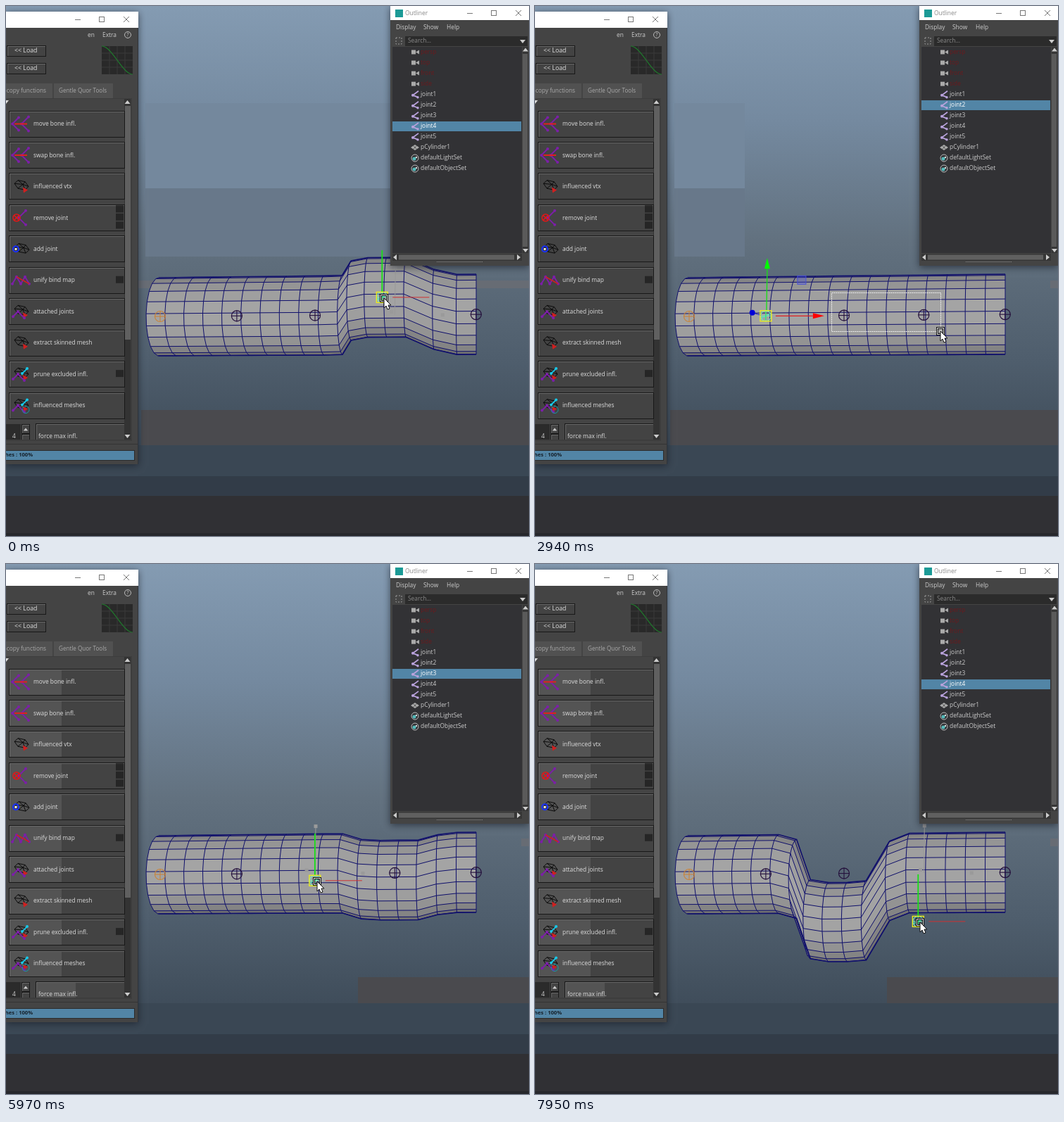
These frames come from a looping animation (743x753 px, 8 s). An HTML page with a canvas:

```html
<!DOCTYPE html>
<html lang="en">
<head>
<meta charset="utf-8">
<title>Skinning demo</title>
<style>
  html, body { margin: 0; width: 100%; height: 100%; overflow: hidden; background: #303034; }
  canvas { display: block; }
</style>
</head>
<body>
<canvas id="stage" width="743" height="753"></canvas>
<script>
const g = document.getElementById('stage').getContext('2d');
const LOOP = 8000, STEP = 135, SWAP = 4200, RINGS = 17, SIDES = 10, MESH = 5;
const NAVY = '#10106c', GREEN = '#3dffa0', BLUE = '#5285a6';

const joints = Array.from({ length: 5 }, (_, n) => [219 + 107.8 * n + 1.1 * n * n, 441 - .7 * n]);

// Mouse actions: the pointer goes from one point to another between start and
// reach, then rests until end. A pick becomes the selection at the end.
const drag = (start, reach, end, joint, to, from = [0, 0]) => ({ start, reach, end, joint, from, to });
const box = (start, reach, end, from, to, pick) => ({ start, reach, end, from, to, pick, box: true });
const stay = (start, end, to, pick) => ({ start, reach: end, end, from: to, to, pick });

const actions = [
  drag(0, 400, 690, 3, [0, 38], [-18, -25]),
  box(960, 1190, 1230, [306, 424], [346, 458], [1]),
  drag(1350, 1600, 2150, 1, [-4, 37]),
  box(2430, 2940, 3100, [421, 407], [576, 462], [2, 3]),
  stay(3645, 3700, [600, 400], [2, 3, MESH]),
  stay(SWAP, 4720, [106, 213]),
  stay(4960, 5060, [490, 572]),
  box(5330, 5540, 5540, [420, 416], [456, 462], [2]),
  drag(5850, 6440, 6880, 2, [-1, 67]),
  box(7180, 7400, 7530, [510, 422], [551, 471], [3]),
  drag(7650, 7940, LOOP, 3, [-8, 69])
];

const clamp = v => Math.max(0, Math.min(1, v));
const smooth = v => v * v * (3 - 2 * v);
const mix = (a, b, u) => a.map((v, i) => v + (b[i] - v) * u);

const offset = (act, t) => mix(act.from, act.to, clamp((t - act.start) / (act.reach - act.start)));

function pointerOn(act, t) {
  const p = offset(act, t);
  if (act.joint === undefined) return p;
  const [x, y] = joints[act.joint];
  return [x + p[0] + 3, y + p[1] + 1];
}

function pointerAt(t) {
  const past = actions.filter(a => a.start <= t).pop();
  const next = actions.find(a => a.start > t);
  if (t < past.end || !next) return pointerOn(past, t);
  const u = (t - past.end) / (next.start - past.end);
  return mix(pointerOn(past, past.end), pointerOn(next, next.start), u);
}

// Joints 2 and 3 trade the parts of the mesh they move
function weight(ring, joint, t) {
  const part = t > SWAP && joint > 1 ? 5 - joint : joint;
  return smooth(clamp((2.85 - Math.abs(ring - .2 - 4.17 * part)) / 1.55));
}

function rect(x, y, w, h, color) {
  g.fillStyle = color;
  g.fillRect(x, y, w, h);
}
function frame(x, y, w, h, color, width = 1) {
  g.strokeStyle = color;
  g.lineWidth = width;
  g.strokeRect(x, y, w, h);
}
function trace(points, close) {
  g.beginPath();
  points.forEach(p => g.lineTo(p[0], p[1]));
  if (close) g.closePath();
}
function line(color, width, ...points) {
  trace(points);
  g.strokeStyle = color;
  g.lineWidth = width;
  g.stroke();
}
function poly(color, ...points) {
  trace(points, true);
  g.fillStyle = color;
  g.fill();
}
function dot(x, y, r, color) {
  g.beginPath();
  g.arc(x, y, r, 0, 7);
  g.fillStyle = color;
  g.fill();
}
function ring(x, y, r, color, width = 1) {
  g.beginPath();
  g.arc(x, y, r, 0, 7);
  g.strokeStyle = color;
  g.lineWidth = width;
  g.stroke();
}
function cross(x, y, r, color, width = 1) {
  line(color, width, [x - r, y - r], [x + r, y + r]);
  line(color, width, [x - r, y + r], [x + r, y - r]);
}
function text(s, x, y, color = '#ccc', size = 8.4, align = 'left', bold = '') {
  g.font = `${bold} ${size}px "Open Sans", "Noto Sans", sans-serif`;
  g.textAlign = align;
  g.textBaseline = 'middle';
  g.fillStyle = color;
  g.fillText(s, x, y);
}
function arrow(x, y, dx, dy) {
  poly('#ccc', [x + dx * 3, y + dy * 3], [x - dx * 2 + dy * 4, y - dy * 2 + dx * 4], [x - dx * 2 - dy * 4, y - dy * 2 - dx * 4]);
}
function dashed(pattern, paint) {
  g.setLineDash(pattern);
  paint();
  g.setLineDash([]);
}
function windowBox(x, y, w, h, bar, buttonsX) {
  g.save();
  g.shadowColor = 'rgba(20,25,35,.65)';
  g.shadowBlur = 10;
  g.shadowOffsetY = 2;
  rect(x, y, w, h, '#444');
  g.restore();
  rect(x, y, w, bar, '#fff');
  const by = Math.floor(y + bar / 2);
  line('#777', 1, [buttonsX - 4, by + .5], [buttonsX + 4, by + .5]);
  frame(buttonsX + 30.5, by - 3.5, 7, 7, '#777');
  cross(buttonsX + 69, by, 4, '#777');
}

function background(t) {
  const sky = g.createLinearGradient(0, 0, 0, 668);
  ['#849bb2', '#74899f', '#62717f', '#4f5e6d', '#3a4754'].forEach((c, i) => sky.addColorStop(i / 4, c));
  rect(0, 0, 743, 668, sky);
  if (t < 3480) {
    const w = t < 1230 ? 545 : 100;
    rect(198, 138, w, 121, '#74889d');
    rect(198, 259, w, 97, '#68788a');
  }
  rect(t < 1230 ? 188 : 732, 390, 555, 11, '#676c74');
  const left = t < SWAP ? 192 : 500, top = t < 5850 ? 574 : 587;
  rect(left, top, 743 - left, 624 - top, '#4a4a4e');
  rect(0, 624, 743, 44, '#3a4754');
  rect(0, 668, 743, 28, '#323c48');
  rect(0, 696, 743, 53, '#303034');
  rect(0, 749, 743, 4, '#26272c');
}

function mesh(t, act, dx, dy, color) {
  // Edges along the tube are turned a little; the first and last are its outline
  const angles = Array.from({ length: SIDES + 2 }, (_, k) =>
    Math.max(0, Math.min(Math.PI, (k - .25) * Math.PI / SIDES)));
  const rows = Array.from({ length: RINGS + 1 }, (_, i) => {
    const u = i / RINGS, w = act ? weight(i, act.joint, t) : 0;
    return angles.map(a => [
      217 + 451 * u - 16 * u * (1 - u) - 18 * (1 - u) * Math.sin(a) + dx * w,
      441.5 - 3.5 * u - (55.5 + 1.5 * u) * Math.cos(a) + dy * w
    ]);
  });
  for (let i = 0; i < RINGS; i++) {
    for (let k = 0; k <= SIDES; k++) {
      const a = (angles[k] + angles[k + 1]) / 2;
      const v = Math.round(98 + 66 * Math.sin(a) ** .8 + 6 * Math.cos(a));
      poly(`rgb(${v},${v},${v})`, rows[i][k], rows[i + 1][k], rows[i + 1][k + 1], rows[i][k + 1]);
    }
  }
  rows.forEach(r => line(color, 1, ...r));
  angles.forEach((a, k) => line(color, a % Math.PI ? 1 : 1.6, ...rows.map(r => r[k])));
}

function jointMark(x, y, color) {
  ring(x, y, 7.5, color, 1.2);
  line(color, 1.1, [x - 8, y], [x + 8, y]);
  line(color, 1.1, [x, y - 8], [x, y + 8]);
}

function manipulator(n, dx, dy, dragging) {
  const [hx, hy] = joints[n], x = hx + dx, y = hy + dy;
  const bx = hx - 26.5 + 7.3 * n, by = hy - 4.5;
  if (dragging) {
    line('#999', 1, [hx, hy], [hx + 1, hy - 67]);
    [[hx + 1, hy - 67], [hx + 68, hy], [bx, by]].forEach(p => rect(p[0] - 2.5, p[1] - 2.5, 5, 5, '#9a9a9a'));
    line('#16e016', 1.8, [x, y - 8], [x, y - 67]);
    line('#d03030', 1, [x + 15, y], [x + 67, y]);
  } else {
    line('#16e016', 1.3, [x + 1, y - 8], [x + 2, y - 67]);
    poly('#00ff00', [x + 2, y - 82], [x + 6, y - 67], [x - 2, y - 67]);
    line('#e02020', 1.2, [x + 14, y], [x + 67, y]);
    poly('#ff0000', [x + 83, y], [x + 67, y - 4], [x + 67, y + 4]);
    line('#2020d0', 1, [bx, by], [x - 7, y - 1]);
    dot(bx, by, 4, '#0000d8');
    rect(x + 45, y - 57, 12, 12, 'rgba(70,80,230,.3)');
    frame(x + 45, y - 57, 12, 12, '#4a50d8');
  }
  line('#44f0c0', 1.2, [x - 6, y + 3], [x + 6, y - 3]);
  line('#30e060', 1.2, [x, y - 6], [x, y + 6]);
  frame(x - 8, y - 7.5, 16, 15, '#f0f018', 1.3);
}

function bone(color, ...points) {
  line(color, 2, ...points);
  points.forEach(p => dot(p[0], p[1], 2, color));
}
function chevron(x, y, r) {
  bone('#7c1fa8', [x + r, y - r], [x, y], [x + r, y + r]);
}
function cage(x, y) {
  const corners = Array.from({ length: 6 }, (_, i) => [x + 10 * Math.cos(i * 1.05), y + 7 * Math.sin(i * 1.05 + .3)]);
  corners.forEach((c, i) => line('#0a0a0a', 1, [x + 2, y - 1], c, corners[(i + 1) % 6]));
}

const icons = {
  bones(y) {
    chevron(9, y, 9);
    chevron(22, y, 10);
    line('#e02020', 2, [12, y], [30, y]);
  },
  cut(y) {
    chevron(18, y, 10);
    ring(15, y, 5, '#e01818', 1.5);
    cross(15, y, 4, '#e01818', 1.5);
  },
  map(y) {
    const zig = [0, 1, 2, 3, 4].map(i => [9 + i * 6, y + (i % 2 ? -5 : 5)]);
    bone('#7c1fa8', ...zig);
    line('#d02020', 1.5, zig[1], zig[4]);
  },
  add(y) {
    cage(23, y - 1);
    ring(14, y, 4, '#1830ff', 2);
    dot(14, y, 1.5, '#fff');
  },
  pick(y) {
    cage(22, y - 2);
    poly('#d02020', [24, y + 1], [31, y + 5], [25, y + 9]);
  },
  attach(y) {
    icons.pick(y);
    bone('#7c1fa8', [10, y + 7], [17, y], [26, y + 9]);
  },
  paint(y) {
    icons.attach(y);
    bone('#18c8e8', [23, y - 1], [30, y - 8]);
  },
  group(y) {
    icons.paint(y);
    ring(28, y + 6, 5, '#159aa8');
  }
};

function button(x, y, w, h, lit = 0) {
  rect(x, y, w, h, '#434343');
  rect(x, y, lit, h, '#545454');
  line('#6a6a6a', 1, [x + 1.5, y + h], [x + 1.5, y + 1.5], [x + w, y + 1.5]);
  frame(x + .5, y + .5, w - 1, h - 1, '#181818');
}

// Name, icon and number of small check boxes
const tools = [
  ['move bone infl.', 'bones'], ['swap bone infl.', 'bones'], ['influenced vtx', 'pick'], ['remove joint', 'cut', 3],
  ['add joint', 'add'], ['unify bind map', 'map', 1], ['attached joints', 'attach'], ['extract skinned mesh', 'pick'],
  ['prune excluded infl.', 'paint', 1], ['influenced meshes', 'group']
];

function toolPanel(late) {
  windowBox(0, 8, 188, 643, 23, 102);
  text('en', 116, 41.5);
  text('Extra', 137, 41.5);
  ring(173, 41, 4.5, '#bbb');
  text('?', 173, 41.5, '#ccc', 7, 'center');
  [56, 81].forEach(y => {
    button(1, y, 56, 16);
    text('<< Load', 12, y + 8, '#ddd', 8.8);
  });
  rect(136, 57, 44, 40, '#292929');
  for (let i = 1; i < 4; i++) {
    line('#3a3a3a', 1, [136 + i * 11, 57], [136 + i * 11, 97]);
    line('#3a3a3a', 1, [136, 57 + i * 10], [180, 57 + i * 10]);
  }
  line('#1f7a2c', 1.2, ...Array.from({ length: 23 }, (_, i) => [136 + i * 2, 57 + 40 * smooth(i / 22)]));

  rect(0, 110, 66, 21, '#515151');
  rect(68, 110, 84, 21, '#515151');
  text('copy functions', 57, 120.5, '#aaa', 8.3, 'right');
  text('Gentle Quor Tools', 75, 120.5, '#aaa', 8.1);
  rect(0, 131, 179, 487, '#3d3d3d');
  rect(0, 132, 168, 484, '#444');
  poly('#ddd', [0, 134], [4, 134], [0, 139]);
  rect(168, 132, 9, 484, '#333');
  rect(169, 142, 8, 332, '#606060');
  arrow(172.5, 137, 0, -1);
  arrow(172.5, 611, 0, 1);

  tools.forEach(([name, icon, marks = 0], i) => {
    const y = 167.5 + i * 44.45;
    button(4, Math.round(y - 19), 165, 38, late ? 75 : 0);
    icons[icon](y);
    text(name, 39, y + .5, '#ddd');
    for (let m = 0; m < marks; m++) rect(156, y - 6 + 11.5 * (m - (marks - 1) / 2), 11, 10, '#262626');
  });

  g.save();
  g.beginPath();
  g.rect(0, 590, 168, 26);
  g.clip();
  rect(0, 594, 21, 24, '#2b2b2b');
  text('4', 9, 612);
  button(22, 594, 12, 14);
  button(22, 608, 12, 14);
  arrow(28, 602, 0, -.8);
  button(42, 593, 127, 30, late ? 57 : 0);
  text('force max infl.', 46, 612, '#ddd');
  g.restore();

  line('#333', 1, [0, 622.5], [188, 622.5]);
  rect(0, 631, 183, 15, '#2b2b2b');
  rect(0, 632, 182, 13, BLUE);
  text('meshes : 100%', 38, 638.5, '#16202a', 7.6, 'right', 'bold');
  line('#30343a', 1, [187.5, 31], [187.5, 651]);
}

const cameras = ['persp', 'top', 'front', 'side'];
const nodes = ['joint1', 'joint2', 'joint3', 'joint4', 'joint5', 'pCylinder1', 'defaultLightSet', 'defaultObjectSet'];

function nodeIcon(i, y) {
  if (i < 0) {
    rect(576, y - 3, 6, 6, '#aaa');
    poly('#aaa', [582, y], [587, y - 3], [587, y + 3]);
  } else if (i < MESH) {
    line('#b9a2dc', 1.8, [586, y - 5], [578, y + 1], [585, y + 4]);
    dot(578, y + 1, 2, '#b9a2dc');
    dot(585, y + 4, 1.7, '#b9a2dc');
  } else if (i === MESH) {
    poly('#aaa', [575, y], [581, y - 4], [587, y], [581, y + 4]);
    cross(581, y, 2.5, '#444', .8);
  } else {
    ring(581, y, 5, '#bbb');
    dot(580, y + 1, 2.5, '#5bb');
    dot(583, y - 1, 1.2, '#ddd');
  }
}

function outliner(selected) {
  windowBox(546, 0, 197, 369, 20, 659);
  rect(553, 5, 11, 11, '#1b9a96');
  text('Outliner', 567, 10.5, '#888');
  text('Display', 554, 31);
  text('Show', 593, 31);
  text('Help', 626, 31);
  rect(567, 43, 174, 14, '#2b2b2b');
  text('Search...', 571, 50, '#8a8a8a');
  dashed([2, 2], () => frame(554, 45, 8, 9, '#999'));
  arrow(734, 50, 0, 1);

  rect(549, 58, 184, 293, '#323235');
  [...cameras, ...nodes].forEach((name, row) => {
    const y = 65.5 + row * 15.05, i = row - cameras.length, on = selected.includes(i);
    if (on) rect(549, Math.round(y - 7), 183, 14, BLUE);
    nodeIcon(i, y);
    text(name, 589, y, i < 0 ? '#6b1a1d' : on ? '#fff' : '#ccc');
  });

  rect(734, 58, 8, 293, '#363636');
  rect(734, 68, 7, 274, '#5a5a5a');
  arrow(738, 62.5, 0, -1);
  arrow(738, 347, 0, 1);
  rect(549, 352, 184, 10, '#363636');
  rect(558, 353.5, 164, 7, '#606060');
  arrow(553, 357, -1, 0);
  arrow(728, 357, 1, 0);
  dashed([1, 1], () => line('#888', 1, [612, 363.5], [677, 363.5]));
}

function pointer(x, y) {
  frame(x - 4.5, y - 4.5, 9, 9, '#111', 3);
  frame(x - 4.5, y - 4.5, 9, 9, '#ddd', 1);
  const shape = [[0, 0], [0, 14], [3, 11], [5, 16], [8, 15], [6, 10], [10, 10]].map(p => [x + p[0], y + p[1]]);
  poly('#fff', ...shape);
  line('#111', 1, ...shape, shape[0]);
}

function draw(t) {
  const act = actions.find(a => t >= a.start && t < a.end) || {};
  const pulled = act.joint === undefined ? null : act;
  const [dx, dy] = pulled ? offset(act, t) : [0, 0];
  const done = actions.filter(a => a.pick && a.end <= t).pop();
  const selected = done ? done.pick : [3];
  const [cx, cy] = pointerAt(t).map(Math.round);

  background(t);
  mesh(t, pulled, dx, dy, selected.includes(MESH) ? GREEN : NAVY);
  joints.forEach(([x, y], i) => {
    const moved = pulled && act.joint === i ? 1 : 0;
    const color = selected.includes(i) ? (selected.length > 1 ? '#fff' : '#7ce8b8') : i ? '#24103c' : '#c8843c';
    jointMark(x + dx * moved, y + dy * moved, color);
  });
  manipulator(selected[0], dx, dy, pulled);
  if (act.box) {
    const [x, y] = act.from;
    dashed([2, 1], () => frame(x + .5, y + .5, cx - x, cy - y, '#eee'));
  }
  toolPanel(t >= SWAP);
  outliner(selected);
  pointer(cx, cy);
}

function tick() {
  const t = performance.now() % LOOP;
  draw(Math.floor((t + 30) / STEP) * STEP);
  requestAnimationFrame(tick);
}
tick();
</script>
</body>
</html>
```
